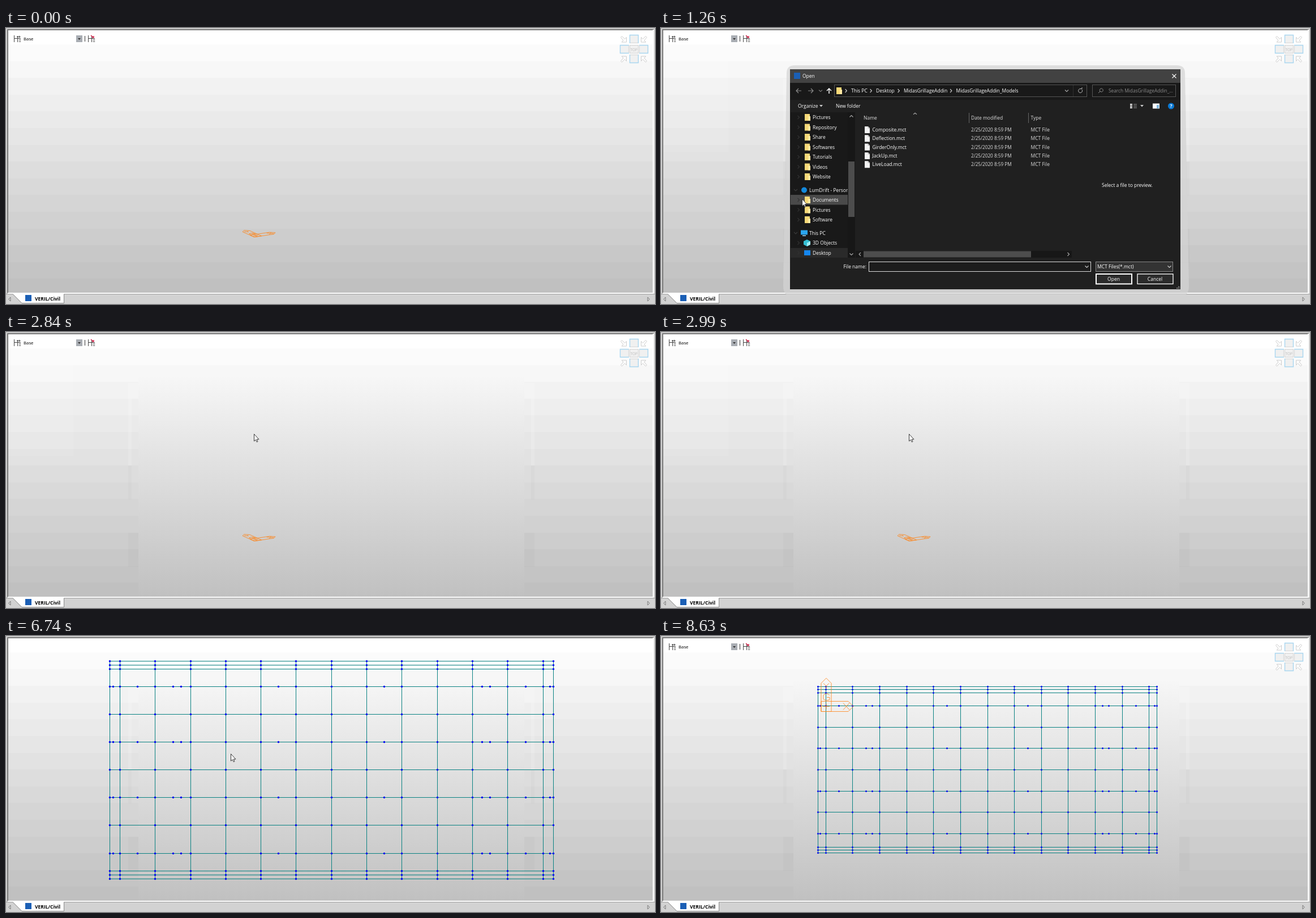
Recreate the animation shown at these times as an HTML page. Size 1147 by 488 pixels, loop 9.34 s.

```html
<!DOCTYPE html>
<html lang="en">
<head>
<meta charset="utf-8">
<title>Grillage model viewer</title>
<style>
  html, body { margin: 0; width: 100%; height: 100%; overflow: hidden; background: #d2d2d2; }
  svg { display: block; width: 100vw; height: 100vh; font: 8.5px "Open Sans", "Noto Sans", sans-serif; }
  text { white-space: pre; }
  .crisp { shape-rendering: crispEdges; }
</style>
</head>
<body>
<svg id="stage" viewBox="0 0 1147 488" xmlns="http://www.w3.org/2000/svg"></svg>
<script>
const LOOP = 9340;
const rect = (x, y, w, h, fill, extra = '') =>
  `<rect x="${x}" y="${y}" width="${w}" height="${h}" fill="${fill}" ${extra}/>`;
const line = (d, stroke, w = 1, extra = '') =>
  `<path d="${d}" fill="none" stroke="${stroke}" stroke-width="${w}" ${extra}/>`;
const shape = (d, fill, extra = '') => `<path d="${d}" fill="${fill}" ${extra}/>`;
// y is the middle of the text line
const text = (x, y, s, fill = '#fff', extra = '') =>
  `<text x="${x}" y="${y + 3}" fill="${fill}" ${extra}>${s}</text>`;
const group = (id, body, extra = '') => `<g id="${id}" ${extra}>${body}</g>`;
const range = n => [...Array(n).keys()];

function backdrop() {
  const bands = range(16).map(i => {
    const v = Math.round(255 - 63 * i / 15);
    return rect(4, Math.max(4, Math.round(29.6 * i - .6)), 1139, 30, `rgb(${v},${v},${v})`);
  }).join('');
  return `<defs>
    <linearGradient id="fog" gradientUnits="userSpaceOnUse" x1="0" y1="4" x2="0" y2="470">
      <stop stop-color="#fff"/><stop offset=".06" stop-color="#fdfdfd"/><stop offset="1" stop-color="#c0c0c0"/>
    </linearGradient>
    <clipPath id="nav"><rect x="229" y="149" width="101" height="257"/></clipPath>
    <clipPath id="view"><rect x="4" y="4" width="1139" height="464"/></clipPath>
  </defs>` +
    rect(0, 0, 1147, 488, '#d2d2d2') + rect(0, 0, 1147, 1, '#c4c4c4') +
    rect(2, 2, 1143, 467, '#777') + rect(1143, 3, 2, 467, '#fff') + rect(3, 468, 1142, 2, '#fff') +
    `<g clip-path="url(#view)">${bands}</g>`;
}

function residue() {
  const faint = (x, y, w, h, c, a) => rect(x, y, w, h, c, `opacity="${a}"`);
  return rect(234, 80, 682, 388, 'url(#fog)') +
    [216, 928].map(x => faint(x, 118, 6, 118, '#fff', .15) + faint(x, 236, 6, 60, '#000', .02)).join('') +
    [216, 916].map(x => faint(x, 90, 18, 28, '#fff', .15) + faint(x, 355, 18, 60, '#000', .02)).join('');
}

function tabs() {
  return rect(0, 470, 1147, 18, '#d2d2d2') + rect(0, 470, 1147, 1, '#a0a0a0') +
    shape('M12 470L28 486H102V470Z', '#fff') + line('M12 470.5L28 486.5H102.5V471', '#8a8a8a') +
    line('M8 476L4.5 479.5L8 483ZM1134 476L1137.500 479.5L1134 483Z', '#666', .8) +
    rect(34, 472, 11, 11, '#1b5fb5') + text(51, 479, 'VERIL/Civil', '#000', 'font-weight="700"');
}

function hud() {
  const gauge = x => line(`M${x + .5} 13V25M${x} 18.500H${x + 12}M${x + 6.5} 14V25`, '#444', 1, 'class="crisp"') +
    line(`M${x + 9.5} 20V25M${x + 11.5} 20V25`, '#555', 1, 'stroke-dasharray="2 1"');
  const face = (x, y, d) => rect(x + .5, y + .5, 15, 14, '#f0f0f0', 'stroke="#d4d4d4"') + line(d, '#a9d6f0', 1.4);
  const arrow = (x, y, sx, sy) => line('M-5.500 -3.500L-3.500 -5.500L1.500 -.5L4.500 -3.500V5H-4L-1 2Z', '#cdcdcd', 1,
    `transform="translate(${x} ${y}) scale(${sx} ${sy})"`);
  return gauge(14) + line('M19 15.500H25M23 13.500L25 15.500L23 17.500', '#444') +
    text(31, 19, 'Base', '#000', 'font-size="7.8"') +
    rect(124, 13, 11, 12, '#a9adb3') + shape('M127 18H132L129.500 21Z', '#333') + rect(139, 14, 1, 10, '#333') +
    gauge(145) + line('M150 13L155 17M155 14V17H152', '#d0103a', 1.2) +
    face(1102, 12, 'M1102.500 27V12.500H1117.500V27') + face(1085, 30, 'M1101 30.500H1085.500V44.500H1101') +
    face(1102, 30, '') + face(1119, 30, 'M1119 30.500H1134.500V44.500H1119') + face(1102, 47, 'M1102.500 47V61.500H1117.500V47') +
    text(1103.4, 38, 'TOP', '#bdbdbd', 'font-size="6.6"') +
    arrow(1092, 20, 1, 1) + arrow(1127, 20, -1, 1) + arrow(1092, 55, 1, -1) + arrow(1127, 55, -1, -1);
}

const navItems = [
  ['Pictures', 158], ['Repository', 175.5], ['Share', 193], ['Softwares', 210.5], ['Tutorials', 228],
  ['Videos', 245.5], ['Website', 263], ['LumDrift - Personal', 286.5, 'cloud'], ['Documents', 304], ['Pictures', 321.5],
  ['Software', 339], ['This PC', 362.5, 'pc'], ['3D Objects', 380, 'cube'], ['Desktop', 397.5, 'desk']
];
const files = ['Composite', 'Deflection', 'GirderOnly', 'JackUp', 'LiveLoad'];
const rowY = i => 180 + 15.3 * i;

const folder = (x, y) => rect(x, y - 6, 9, 12, '#f7d877') + rect(x + 6, y - 2, 4, 8, '#ffe9a2');
const screen = (x, y) => rect(x, y - 5, 12, 8, '#2aa5ee') + rect(x + 3, y + 4, 6, 1.5, '#9fd8fa');
const icons = {
  cloud: y => `<circle cx="253" cy="${y}" r="5" fill="#1389dc"/>`,
  pc: y => screen(247, y),
  desk: y => rect(253, y - 4.5, 11, 9, '#1687f0'),
  cube: y => shape(`M258 ${y - 6}L264 ${y - 3}V${y + 3}L258 ${y + 6}L252 ${y + 3}V${y - 3}Z`, '#35bfd3') +
    shape(`M258 ${y}L264 ${y - 3}V${y + 3}L258 ${y + 6}Z`, '#a4ecf4')
};
const chevron = (x, y, dx, dy, c = '#aaa') => line(dx
  ? `M${x - dx} ${y - 3}L${x + dx} ${y}L${x - dx} ${y + 3}` : `M${x - 3} ${y - dy}L${x} ${y + dy}L${x + 3} ${y - dy}`, c, 1.1);

function dialog() {
  const dim = '#8b8b8b';
  const nav = navItems.map(([name, y, icon]) => {
    const top = icon === 'cloud' || icon === 'pc';
    return (icon ? icons[icon](y) : folder(254, y)) + text(top ? 262 : 268, y, name) +
      (top ? chevron(238, y, 0, 1.5, '#3c3c3c') : chevron(243, y, 1.5, 0, '#333'));
  }).join('');
  const rows = files.map((name, i) => {
    const y = rowY(i);
    return shape(`M360 ${y - 6}H366L369 ${y - 3}V${y + 6}H360Z`, '#f4f4f4') + line(`M366 ${y - 6}V${y - 3}H369`, '#999', .8) +
      text(373.5, y, name + '.mct') + text(548, y, '2/25/2020 8:59 PM', '#ddd', 'font-size="8.2"') + text(653.5, y, 'MCT File', '#ddd');
  }).join('');
  const crumbs = [[336, 'This PC'], [380, 'Desktop'], [429, 'MidasGrillageAddin'], [521.5, 'MidasGrillageAddin_Models']]
    .map(([x, s]) => chevron(x - 9, 111, 1.4, 0, '#ccc') + text(x, 111, s)).join('');
  const button = (x, s, w) => rect(x + 1, 435, 63, 17.5, '#2b2b2b', `stroke="#fff" stroke-width="${w}"`) +
    text(x + 32, 443.5, s, '#fff', 'text-anchor="middle"');
  return shape('M236 66H912Q926 66 926 80L933 456Q933 474 918 474H232Q216 474 216 456L222 80Q222 66 236 66Z', '#d4d4d4', 'opacity=".7"') +
    rect(228, 73, 690, 389, '#202020') + rect(228, 73, 690, 24, '#424242') + rect(228, 97, 690, 30, '#191919') +
    rect(235, 79, 11, 11, '#1b5fb5') + text(250, 85, 'Open') + line('M903.500 81.500L910.500 88.500M910.500 81.500L903.500 88.500', '#fff', 1.1) +
    line('M248 111H239M243 107L239 111L243 115M260 111H269M265 107L269 111L265 115', dim, 1.2) + chevron(282, 111, 0, 1.3, dim) +
    line('M297 116V107M293 111L297 107L301 111', '#fff', 1.5) +
    rect(306.5, 100.5, 446, 21, '#191919', 'stroke="#555"') + line('M728.500 101V121', '#303030') + folder(310, 111) + crumbs +
    chevron(717, 111, 0, 1.5) + line('M744 109A3.500 3.500 0 1 1 741 107.500H744V105', '#bbb', 1) +
    rect(762.5, 100.5, 147, 21, '#191919', 'stroke="#555"') + line('M773 115L776 112M776 112A3 3 0 1 1 778 113Z', dim) +
    text(791, 111, 'Search MidasGrillageAddin_...', dim, 'font-size="8.3"') +
    text(242, 138, 'Organize') + shape('M280 136H286L283 139.500Z', '#ccc') + text(309, 138, 'New folder') +
    line('M829 135H833M829 138H833M829 141H833', '#fff', 2) + line('M835 135H841M835 138H841M835 141H841', '#999') +
    shape('M847 136H853L850 139.500Z', '#ccc') + rect(869, 133.5, 12, 9, '#fff') + rect(876, 136, 4, 6, '#7fb6df') +
    '<circle cx="901.5" cy="138" r="5.5" fill="#0a7ad6"/>' + text(901.5, 138, '?', '#fff', 'text-anchor="middle" font-weight="700"') +
    rect(229, 149, 101, 257, '#191919') + rect(330, 149, 13, 257, '#171717') + rect(331, 236, 11, 98, '#4d4d4d') +
    chevron(336.5, 156, 0, -1.5) + chevron(336.5, 400, 0, 1.5) + rect(229, 389, 101, 17, '#2a2a2a') +
    rect(0, 0, 0, 0, '#4a4a4a', 'id="hover"') + `<g clip-path="url(#nav)">${nav}</g>` +
    text(358, 159, 'Name', '#ddd') + text(548, 159, 'Date modified', '#ddd') + text(653.5, 159, 'Type', '#ddd') +
    chevron(449, 151.5, 0, -1.2) + line('M544.500 150V168M649.500 150V168', '#666', 1, 'class="crisp"') + rows +
    rect(344, 394, 382, 12, '#171717') + rect(358, 394.5, 296, 11, '#4d4d4d') +
    chevron(351.5, 400, -1.5, 0) + chevron(720, 400, 1.5, 0) + text(779, 278, 'Select a file to preview.') +
    text(363, 421.5, 'File name:', '#fff', 'text-anchor="end"') + rect(367.5, 413.5, 392, 17, '#1c1c1c', 'stroke="#ddd"') +
    group('typed', text(371, 422, 'Composite.mct')) + rect(370, 416, 1.2, 11.5, '#fff', 'id="caret"') + chevron(752.5, 422, 0, 1.5, '#ccc') +
    rect(768.5, 413.5, 136, 17, '#333', 'stroke="#888"') + text(771, 422, 'MCT Files(*.mct)') + chevron(898.5, 422, 0, 1.5, '#ccc') +
    button(768, 'Open', 2) + button(841, 'Cancel', 1.3) + line('M911 460H917M914 457.500H917', '#aaa', 1.4, 'stroke-dasharray="1.5 1"');
}

// Axis marker, drawn flat: x to the right, y up
const axisPath = 'M-9 -9H39L48 0L39 9H-9ZM-9 -9V41L0 50L9 41V-9ZM30 -6L41 6M30 6L41 -6M-6 0H6M0 -5V5' +
  'M-5 41L0 36L5 41M0 36V31M6 20Q0 25 -5 20V13Q0 9 6 12V16H1';

document.getElementById('stage').innerHTML = backdrop() + group('residue', residue()) +
  rect(4, 4, 115, 215, '#fff', 'id="menu"') +
  group('model', line('', '#0a8282', 1, 'id="beams"') + line('', '#0000f0', 3, 'id="nodes" stroke-linecap="round"')) +
  group('axis', line(axisPath, '#ff8214', .8, 'vector-effect="non-scaling-stroke"')) +
  line('M-14 .5H-6M0 .5H8M-.5 -14V15', '#111', 1, 'id="cross" class="crisp"') +
  group('hud', hud()) + tabs() + group('dialog', dialog()) +
  shape('M.5 .5V13L3.300 10.500L5.200 14.500L7 13.700L5.200 9.800H9Z', '#fff', 'id="cursor" stroke="#222" stroke-width=".9"');

const el = {};
document.querySelectorAll('[id]').forEach(n => el[n.id] = n);
const show = (n, on) => n.setAttribute('visibility', on ? 'visible' : 'hidden');
const set = (n, attrs) => Object.entries(attrs).forEach(([k, v]) => n.setAttribute(k, v));

// Share of a stepped change: 0 before start, 1 from the last step on
function stepped(t, start, end, n) {
  if (t < start) return 0;
  if (t >= end) return 1;
  return (Math.floor((t - start + 1) / ((end - start) / (n - 1))) + 1) / n;
}

// Pointer stops: start, end, steps, points
const moves = [
  [480, 870, 6, [[81, 71], [100, 86], [120, 98], [140, 110], [158, 120], [174, 129]]],
  [1110, 1500, 6, [[210, 220], [249, 302], [345, 385], [475, 414], [560, 410], [587, 395]]],
  [1660, 2210, 8, [[565, 355], [545, 306], [535, 305], [532, 269], [500, 235], [470, 210], [450, 190], [438, 180]]],
  [3770, 4000, 4, [[438, 219], [367, 194], [366, 120], [360, 52]]],
  [4240, 4560, 5, [[340, 60], [315, 75], [285, 92], [255, 104], [243, 109]]],
  [4870, 5100, 4, [[242, 111], [240, 113], [238, 115], [237, 117]]],
  [5340, 5500, 3, [[235, 122], [233, 127], [231, 130]]],
  [5800, 6670, 12, [[397, 208]]],
  [6740, 7220, 7, [[397, 208], [397, 208], [385, 214], [370, 221], [356, 228], [346, 232], [343, 233]]],
  [7770, 7770, 1, [[343, 235]]],
  [8080, 8320, 4, [[325, 222], [480, 270], [730, 345], [912, 405]]],
  [8470, 8630, 3, [[862, 369], [1039, 421], [1039, 421]]]
];

function pointer(t) {
  let pos = [81, 71];
  for (const [start, end, n, pts] of moves) {
    if (t < start) break;
    const path = [pos, ...pts];
    const f = stepped(t, start, end, n) * pts.length;
    const i = Math.min(Math.floor(f + 1e-6), pts.length - 1);
    pos = [0, 1].map(k => path[i][k] + (path[i + 1][k] - path[i][k]) * (f - i));
  }
  return pos;
}

// Grillage lines around the centre of the deck
const xs = [-392, ...range(13).map(i => (i - 6) * 62.3), 392];
const outer = [178.5, 185.5, 192.5];
const inner = range(7).map(i => (i - 3) * 49.2);
const ys = [...outer.map(y => -y), ...inner, ...outer];
const extras = [-386, -343, -280, -266, -93.5, 93.5, 266, 280, 343, 386];
const nodes = [...xs.flatMap(x => ys.map(y => [x, y])),
  ...inner.filter((y, i) => i % 2 === 0).flatMap(y => extras.map(x => [x, y]))];

function drawModel(t) {
  const p = stepped(t, 5800, 6670, 12), z = stepped(t, 6740, 7220, 7);
  const flat = p === 1;
  const turn = Math.PI / 6 * (1 - p) ** 2;
  const tilt = Math.sin((14.9 + 75.1 * p ** 1.2) * Math.PI / 180);
  const scale = z ? .765 + .31 * (1 - z) ** 1.8 : 1.15 - .075 * p;
  const c = Math.cos(turn) * scale, s = Math.sin(turn) * scale;
  const cx = 575 + 2 * z;
  const at = (x, y) => [cx + x * c + y * s, 236.6 + tilt * (y * c - x * s)];
  const pt = (x, y) => at(x, y).map(v => (flat ? Math.floor(v) : v) + .5).join(' ');
  set(el.beams, { d: ys.map(y => `M${pt(-392, y)}L${pt(392, y)}`).join('') +
    xs.map(x => `M${pt(x, -192.5)}L${pt(x, 192.5)}`).join(''), 'stroke-width': flat ? 1 : .9 });
  set(el.nodes, { d: nodes.map(([x, y]) => `M${pt(x, y)}h0`).join(''), 'stroke-width': flat && scale > .9 ? 3.6 : 3 });
}

function drawAxis(t) {
  show(el.axis, t < 3150 || (t >= 3470 && t < 5800) || t >= 7450);
  const m = t < 3150 ? [.72, -.107, -.415, -.185, 441.5, 367]
    : t < 5800 ? [.67, -.1, -.386, -.172, 118, 255] : [1, 0, 0, -1, 292, 124.5];
  set(el.axis, { transform: `matrix(${m})` });
}

function drawDialog(t, [x, y]) {
  const open = stepped(t, 480, 870, 6), close = stepped(t, 2450, 2610, 3);
  show(el.dialog, open > 0 && close < 1);
  const k = 1 - .08 * (1 - open) ** 2 - .06 * close;
  set(el.dialog, { opacity: Math.min(1, open * 1.5) * (1 - close),
    transform: `translate(573 267) scale(${k}) translate(-573 -267)` });
  const item = navItems.find(n => Math.abs(n[1] - y) < 8.8);
  const row = files.findIndex((f, i) => Math.abs(rowY(i) - y) < 7.7);
  let box = [0, 0, 0, 0];
  if (x > 229 && x < 330 && item) box = [229, item[1] - 9, 101, 17.5];
  else if (x > 356 && x < 726 && row >= 0) box = [356, rowY(row) - 8, 370, 15.5];
  set(el.hover, { x: box[0], y: box[1], width: box[2], height: box[3], fill: t < 2370 ? '#4a4a4a' : '#777' });
  el.caret.style.display = t > 870 && t < 2370 && !(t > 1140 && t < 1660) ? '' : 'none';
  el.typed.style.display = t >= 2370 ? '' : 'none';
}

function draw(t) {
  const pos = pointer(t);
  const crossing = t >= 3770 && t < 3923;
  show(el.menu, t >= 150 && t < 3310);
  set(el.menu, { opacity: t < 240 ? .3 : .08 });
  show(el.residue, t >= 870);
  show(el.hud, t < 3150 || (t >= 3470 && t < 6740) || t >= 7450);
  show(el.model, t >= 3310);
  if (t >= 3310) drawModel(t);
  drawAxis(t);
  drawDialog(t, pos);
  show(el.cross, t >= 3770 && t < 5800);
  set(el.cross, { transform: t < 3845 ? 'translate(443 226)' : 'translate(372 201)' });
  show(el.cursor, t >= 480 && t < 8625 && !crossing);
  set(el.cursor, { transform: `translate(${pos.map(Math.round)})` });
}

const begin = performance.now();
function tick() {
  draw((performance.now() - begin) % LOOP);
  requestAnimationFrame(tick);
}
tick();
</script>
</body>
</html>
```
